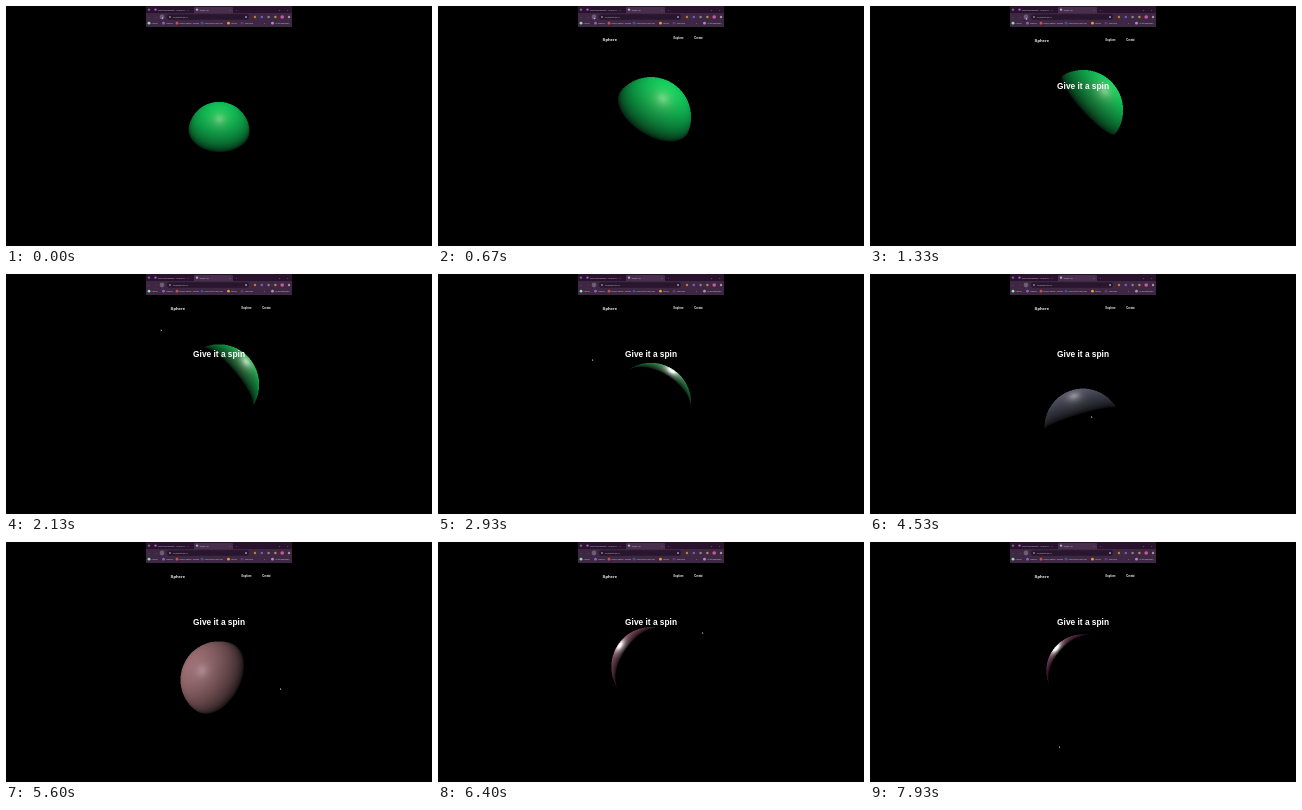
An HTML page with a canvas that plays this animation: 426 px wide and 240 px high, repeating every 8 s.

```html
<!DOCTYPE html>
<html lang="en">
<head>
<meta charset="utf-8">
<title>Sphere</title>
<style>
  html, body { margin: 0; width: 100%; height: 100%; overflow: hidden; background: #000; }
  #stage { position: absolute; left: 0; top: 0; width: 426px; height: 240px; overflow: hidden; }
  canvas { position: absolute; left: 140px; top: 21px; width: 146px; height: 219px; }
  svg { position: absolute; left: 0; top: 0; }
  text { font-family: "Liberation Sans", Arial, sans-serif; fill: #fff; }
  .bold { font-weight: 700; }
  .link { font-size: 2.75px; }
  #chrome text { font-size: 2.3px; fill: #cfc3d2; }
</style>
</head>
<body>
<div id="stage">
  <canvas id="view" width="292" height="438"></canvas>
  <svg width="426" height="240" viewBox="0 0 426 240">
    <g id="nav">
      <text class="bold" x="164.6" y="35.8" font-size="4.25">Sphere</text>
      <text class="link bold" x="235.5" y="34.6">Explore</text>
      <text class="link bold" x="256.3" y="34.6">Create</text>
    </g>
    <text id="title" class="bold" x="187.1" y="83.1" font-size="8.35">Give it a spin</text>
    <g id="chrome">
      <rect x="140" width="146" height="21" fill="#28122e"/>
      <rect x="140" y="7" width="146" height="14" fill="#3d2742"/>
      <path d="M188 7.2V2.2q0-1.2 1.2-1.2h36.6q1.2 0 1.2 1.2v5z" fill="#472f4d"/>
      <rect x="161" y="8.3" width="82" height="5.4" rx="2.7" fill="#28162e"/>
      <circle cx="156" cy="11" r="2.4" fill="#6e5b76"/>
    </g>
    <path id="cursor" d="M0 0L0 2.1L.6 1.6L1.5 1.5Z" fill="#ccc"/>
  </svg>
</div>
<script>
const LOOP = 8000, FPS = 15, RES = 2;
const W = 146 * RES, H = 219 * RES;
const FOCAL = H / 2 / Math.tan(Math.PI / 8);
const RADIUS = 3, CAMERA = 20, GREEN = [0, 255, 115];

// Each row: seconds, values
const AZIMUTH = [[0, 2], [1.33, 67], [2.93, 141], [3.6, 166], [4.53, 206], [5.6, 275], [6.4, 255], [7.93, 308]];
const ELEVATION = [[0, 0], [3.6, 0], [4.53, 26], [5.6, 55], [6.4, -31], [6.9, -86], [8, -86]];
const POINTER = [[0, 156, 11], [1.6, 156, 12], [2.5, 154, 85], [3, 154, 85], [3.6, 190, 100], [4.53, 221, 142],
  [5.6, 274, 146], [6.4, 264, 90], [6.9, 258, 55], [7.8, 189, 204], [8, 189, 204]];
const DRAG = [3.6, 6.9], COLOR_LAG = 0.35;

const $ = id => document.getElementById(id);
const ctx = $('view').getContext('2d');
const clamp = x => Math.min(1, Math.max(0, x));
const mix = (a, b, k) => a + (b - a) * k;

function sample(keys, t) {
  let i = 1;
  while (i < keys.length - 1 && t > keys[i][0]) i++;
  const [a, b] = [keys[i - 1], keys[i]];
  const k = clamp((t - a[0]) / (b[0] - a[0]));
  return a.slice(1).map((v, n) => mix(v, b[n + 1], k));
}

// Dragging picks the colour from the pointer position; the sphere follows a little later
function sphereColor(t) {
  if (t < DRAG[0]) return GREEN;
  const [x, y] = sample(POINTER, Math.min(t - COLOR_LAG, DRAG[1]));
  const picked = [(x - 140) / 146 * 255, (y - 21) / 219 * 255, 150];
  const k = clamp((t - DRAG[0]) / 0.4);
  return picked.map((v, n) => mix(GREEN[n], v, k));
}

const toLinear = v => Math.pow(v / 255, 2.2);
const toScreen = v => 255 * Math.pow(clamp(v), 1 / 2.2);
const dot = (a, b) => a[0] * b[0] + a[1] * b[1] + a[2] * b[2];
const norm = a => { const l = Math.hypot(...a); return a.map(v => v / l); };

// GGX highlight for a dielectric
function specular(n, l, v, nl, nv) {
  const a2 = 0.05;
  const h = norm([l[0] + v[0], l[1] + v[1], l[2] + v[2]]);
  const nh = dot(n, h);
  const d = a2 / (Math.PI * Math.pow(nh * nh * (a2 - 1) + 1, 2));
  const f = 0.04 + 0.96 * Math.pow(1 - dot(v, h), 5);
  const g = c => Math.sqrt(a2 + (1 - a2) * c * c);
  return Math.PI * d * f * 0.5 / (nl * g(nv) + nv * g(nl) + 1e-5);
}

function drawSphere(t) {
  const az = sample(AZIMUTH, t)[0] * Math.PI / 180;
  const el = sample(ELEVATION, t)[0] * Math.PI / 180;
  const [s, c] = [Math.sin(el), Math.cos(el)];
  const bob = 1.95 * Math.sin(t + 0.15);
  const r = RADIUS * (1 - 0.23 * Math.pow(1 - clamp(t / 0.4), 2));
  const center = [0, bob * c, bob * s - CAMERA];
  const light = [10 * Math.sin(az), 10 * (c - Math.cos(az) * s), 10 * (s + Math.cos(az) * c) - CAMERA];
  const albedo = sphereColor(t).map(toLinear);

  const half = Math.ceil(FOCAL * r / -center[2] * 1.05) + 2;
  const left = W / 2 - half;
  const top = Math.round(H / 2 + FOCAL * center[1] / center[2]) - half;
  const img = ctx.createImageData(half * 2, half * 2);
  const cc = dot(center, center) - r * r;

  for (let j = 0, p = 0; j < half * 2; j++) {
    for (let i = 0; i < half * 2; i++, p += 4) {
      const ray = norm([left + i + 0.5 - W / 2, H / 2 - top - j - 0.5, -FOCAL]);
      const b = dot(ray, center), disc = b * b - cc;
      if (disc <= 0) continue;
      const hit = ray.map(v => v * (b - Math.sqrt(disc)));
      const n = hit.map((v, k) => (v - center[k]) / r);
      const to = light.map((v, k) => v - hit[k]);
      const dist = Math.hypot(...to);
      const l = to.map(v => v / dist);
      const nl = dot(n, l);
      if (nl <= 0) continue;
      const v = ray.map(x => -x);
      const power = 0.58 * nl * 11.2 / dist;
      const shine = specular(n, l, v, nl, Math.max(0, dot(n, v)));
      for (let k = 0; k < 3; k++) img.data[p + k] = toScreen(power * (albedo[k] + shine));
      img.data[p + 3] = 255;
    }
  }
  ctx.clearRect(0, 0, W, H);
  ctx.putImageData(img, left, top);
}

function add(tag, attrs, content = '') {
  const el = document.createElementNS('http://www.w3.org/2000/svg', tag);
  for (const k in attrs) el.setAttribute(k, attrs[k]);
  el.textContent = content;
  $('chrome').append(el);
}
const dotAt = (cx, cy, fill, r = 1.2) => add('circle', { cx, cy, r, fill });
const label = (x, y, content) => add('text', { x, y }, content);

function buildChrome() {
  dotAt(143, 3.6, '#7d6784');
  dotAt(149.5, 3.6, '#a85fc0');
  label(152, 4.5, 'Web animations - Home p…  ×');
  dotAt(191, 3.6, '#b9a7c0');
  label(193.5, 4.5, 'Three JS');
  label(223.5, 4.5, '×');
  label(230, 4.5, '+');
  label(273, 4.5, '▪');
  label(281, 4.5, '×');
  label(142, 11.9, '←');
  label(148.5, 11.9, '→');
  dotAt(164, 11, '#8c7a92', 1);
  label(167, 11.9, 'localhost:5173');
  dotAt(240, 11, '#a58fb0', 1);
  ['#c77a3a', '#6b62c9', '#8d8290', '#b98a4a', '#c45aa0', '#a294a8']
    .forEach((fill, i) => dotAt(249 + i * 6.8, 11, fill, i === 4 ? 1.8 : 1.2));
  const marks = [[143, '#7fe0b8', 'Assist'], [157.5, '#8065c0', 'Videos'], [171, '#e0483e', 'Music library pages'],
    [196, '#3c4fa0', 'Favourite sites list'], [222.5, '#e89a35', 'Notes'], [236, '#574069', 'Tutorials'],
    [266.5, '#a795ad', 'All bookmarks']];
  for (const [x, fill, name] of marks) {
    dotAt(x, 17.2, fill, 1.4);
    label(x + 2.4, 18, name);
  }
  label(258, 18, '»');
}

function render(now) {
  const t = Math.floor(now % LOOP / 1000 * FPS + 0.06) / FPS;
  drawSphere(t);
  const slide = 1 - Math.pow(1 - clamp((t - 0.3) / 0.5), 2);
  $('nav').setAttribute('transform', `translate(0 ${-18 * (1 - slide)})`);
  $('title').setAttribute('opacity', clamp((t - 0.75) / 0.5));
  $('cursor').setAttribute('transform', `translate(${sample(POINTER, t).join(' ')})`);
}

buildChrome();
const start = performance.now();
function tick() {
  render(performance.now() - start);
  requestAnimationFrame(tick);
}
tick();
</script>
</body>
</html>
```
